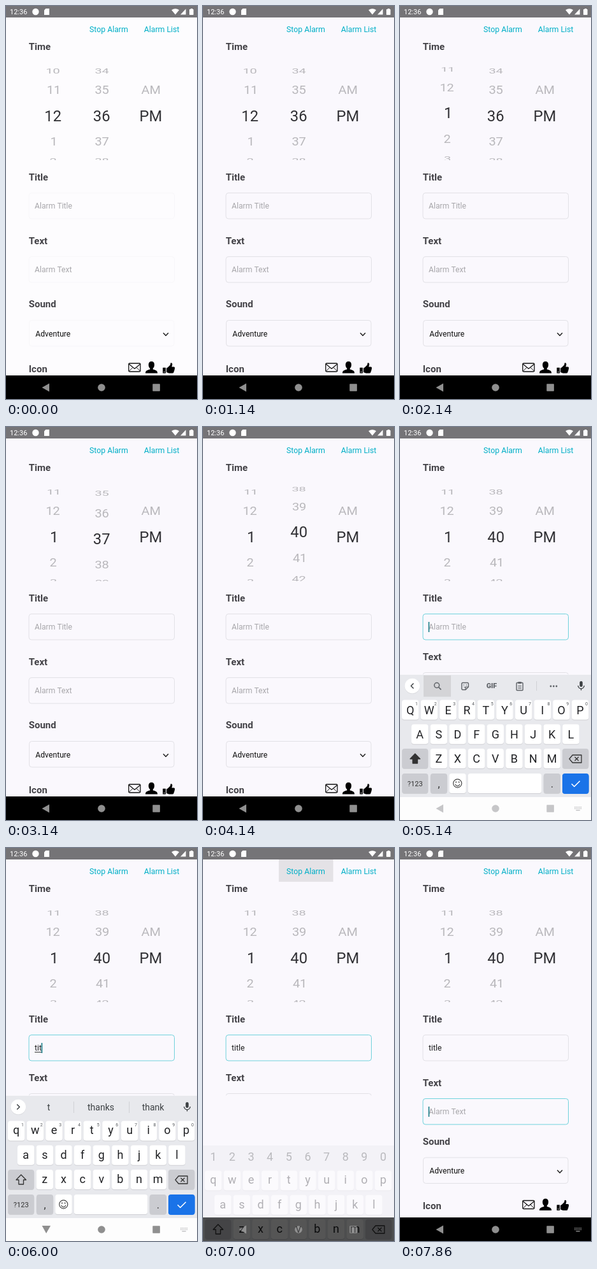
Write an HTML page with a canvas that moves like this. It is 300 px wide and 617 px high and loops after 8 s.

```html
<!DOCTYPE html>
<html lang="en">
<head>
<meta charset="utf-8">
<title>Alarm form</title>
<style>
html, body { margin: 0; width: 100%; height: 100%; overflow: hidden; background: #faf8fd; }
canvas { display: block; width: 300px; height: 617px; }
</style>
</head>
<body>
<canvas id="stage"></canvas>
<script>
const W = 300, H = 617, LOOP = 8000, STEP = 1000 / 7;
const BG = '#faf8fd', INK = '#202124', ICON = '#5f6368', CYAN = '#00afc7', RING = '#70d2dc';
const FONT = 'Roboto, "Open Sans", sans-serif';
const dpr = Math.max(1, window.devicePixelRatio || 1);

function prepare(canvas) {
  canvas.width = W * dpr;
  canvas.height = H * dpr;
  const c = canvas.getContext('2d');
  c.scale(dpr, dpr);
  c.lineJoin = 'round';
  return c;
}
const stage = document.getElementById('stage');
const board = document.createElement('canvas');
const main = prepare(stage), keys = prepare(board);
let g = main;

// Drawing helpers
function text(s, x, y, size, color, align = 'left', weight = 400) {
  g.font = `${weight} ${size}px ${FONT}`;
  g.textAlign = align;
  g.fillStyle = color;
  g.fillText(s, x, y);
}
// Centres the visible ink rather than the advance width
function inkText(s, y, size, color) {
  g.font = `400 ${size}px ${FONT}`;
  g.textAlign = 'left';
  const m = g.measureText(s);
  text(s, (m.actualBoundingBoxLeft - m.actualBoundingBoxRight) / 2, y, size, color);
}
function rect(x, y, w, h, color) {
  g.fillStyle = color;
  g.fillRect(x, y, w, h);
}
function round(x, y, w, h, r, fill, stroke, lw = 1) {
  g.beginPath();
  g.roundRect(x, y, w, h, r);
  if (fill) { g.fillStyle = fill; g.fill(); }
  if (stroke) { g.strokeStyle = stroke; g.lineWidth = lw; g.stroke(); }
}
function disc(x, y, r, fill, stroke, lw = 1) {
  round(x - r, y - r, 2 * r, 2 * r, r, fill, stroke, lw);
}
function trace(pts) {
  g.beginPath();
  for (let i = 0; i < pts.length; i += 2) g.lineTo(pts[i], pts[i + 1]);
}
function line(pts, color, lw = 1, closed = false) {
  trace(pts);
  if (closed) g.closePath();
  g.strokeStyle = color;
  g.lineWidth = lw;
  g.stroke();
}
function poly(pts, color) {
  trace(pts);
  g.fillStyle = color;
  g.fill();
}
function arc(x, y, r, from, to, color, lw) {
  g.beginPath();
  g.arc(x, y, r, from, to);
  g.strokeStyle = color;
  g.lineWidth = lw;
  g.stroke();
}
function shape(d, color) {
  g.fillStyle = color;
  g.fill(new Path2D(d));
}

// Eased value between [time, value] stops
function track(t, stops) {
  if (t <= stops[0][0]) return stops[0][1];
  for (let i = 1; i < stops.length; i++) {
    const [t0, a] = stops[i - 1], [t1, b] = stops[i];
    if (t <= t1) {
      const u = (t - t0) / (t1 - t0);
      return a + (b - a) * u * u * (3 - 2 * u);
    }
  }
  return stops[stops.length - 1][1];
}

function statusBar() {
  rect(0, 0, W, 18, '#757477');
  text('12:36', 6, 13, 11, '#fff');
  disc(46.5, 9, 5.2, '#fff');
  poly([62.5, 4, 68, 4, 68, 14, 60, 14, 60, 6.5], '#fff');
  shape('M260 6.3 Q266 2.2 272 6.3 L266 13.5 Z', '#fff');
  poly([274, 13.5, 282.5, 13.5, 282.5, 4.5], '#fff');
  rect(290, 4, 3, 2, '#fff');
  round(288, 5, 6.5, 9, 0.8, '#fff');
}

function wheel(x, pos, lo, hi, label) {
  const near = Math.round(pos);
  for (let k = Math.max(lo, near - 3); k <= Math.min(hi, near + 3); k++) {
    const a = (k - pos) * 0.5;
    if (Math.abs(a) > 1.42) continue;
    const active = Math.abs(k - pos) < 0.5, size = active ? 23.8 : 20;
    g.save();
    g.translate(x, 172.3 + 84 * Math.sin(a));
    g.scale(1, Math.cos(a));
    inkText(label(k), size * 0.36, size, active ? '#303034' : '#b9b8bc');
    g.restore();
  }
}

function picker(t) {
  const hour = track(t, [[1280, 0], [2143, 1.12], [2570, 1]]);
  const minute = track(t, [[2710, 36], [4142, 40.19], [4290, 40.19], [4710, 40]]);
  g.save();
  g.beginPath();
  g.rect(0, 92, W, 150);
  g.clip();
  wheel(74, hour, -9, 9, k => String((k + 23) % 12 + 1));
  wheel(150.5, minute, 0, 59, k => String(k).padStart(2, '0'));
  wheel(227, 1, 0, 1, k => ['AM', 'PM'][k]);
  g.restore();
}

function field(y, hint, value, focused, border, composing) {
  round(36, y + 0.5, 228.5, 40.5, 4, null, focused ? RING : border);
  text(value || hint, 45, y + 25.3, 12.2, value ? '#1c1c1e' : '#a8a7ab');
  const w = value ? g.measureText(value).width : 0;
  if (composing && w) rect(45, y + 27, w, 1, '#333');
  return 45 + w;
}
function caret(x, y) {
  rect(x - 0.5, y + 13, 1.8, 16, '#2b8791');
}

function envelope(y) {
  round(192.7, y - 7, 18.3, 13, 1.5, null, '#111', 1.3);
  line([193, y - 6, 202, y + 1.5, 211, y - 6], '#111', 1.2);
  line([193, y + 5.5, 199, y - 0.5], '#111', 1);
  line([211, y + 5.5, 205, y - 0.5], '#111', 1);
}
function person(y) {
  g.save();
  g.translate(228.5, y);
  shape('M0 -10 C6 -10 5.5 -1.5 2.3 1 L2.3 2.5 C6 3.5 9.5 4 9.5 8.5 L-9.5 8.5 C-9.5 4 -6 3.5 -2.3 2.5 L-2.3 1 C-5.5 -1.5 -6 -10 0 -10 Z', '#000');
  g.restore();
}
function thumb(y) {
  g.save();
  g.translate(246, y);
  round(0.3, -0.8, 4.6, 8.8, 0.5, '#000');
  shape('M6 0 L8 -1 L12 -5 L12.5 -8 Q15.5 -9 15.2 -5 L14.3 -2 L18 -2 Q19.8 -1.5 19 0.6 Q19.3 2 18.4 3 Q18.6 4.6 17.6 5.4 Q17.6 8 15.5 8 L10 8 L6 6.5 Z', '#000');
  disc(2.6, 6, 0.7, '#fff');
  g.restore();
}

function form(t, s) {
  const border = `rgba(226,225,230,${s.settle})`;
  if (t > 6850 && t < 7270) rect(119, 18, 85.5, 35, '#e4e2e6');
  text('Stop Alarm', 131, 41, 12.3, CYAN);
  text('Alarm List', 216.7, 41, 12.3, CYAN);

  const label = (name, y) => text(name, 35.7, y, 15, '#434247', 'left', 700);
  const inTitle = s.focus === 'title', inText = s.focus === 'text';
  label('Time', 69.3);
  picker(t);

  label('Title', 273.5);
  const end = field(293, 'Alarm Title', s.title, inTitle, border, t < 6700);
  if (inTitle && t < 6850) caret(end, 293);

  let dy = inTitle ? -8 : 0;
  label('Text', 373.5 + dy);
  field(393 + dy, 'Alarm Text', '', inText, border);
  if (inText) caret(45, 393);

  if (inText) dy -= 7.5;
  label('Sound', 473 + dy);
  round(36.5, 493.5 + dy, 227.5, 40.5, 4, null, border);
  text('Adventure', 46.3, 518.7 + dy, 12.2, '#111');
  line([247, 513.3 + dy, 251, 517.5 + dy, 255, 513.3 + dy], '#222', 1.5);

  label('Icon', 574.5 + dy);
  envelope(568 + dy);
  person(568 + dy);
  thumb(568.5 + dy);
}

function navBar(t, s) {
  const light = t > 4990 && t < 6990;
  const fading = light && t < 5270, returning = t > 6990 && t < 7130;
  const c = fading ? '#c6c6c8' : returning ? '#5a5a5a' : '#8f8f8f';
  rect(0, 580, W, 37, light ? '#fdfdfd' : '#000');
  if (light && !fading) poly([56.5, 593, 70, 593, 63.2, 605], c);
  else poly([68, 592.5, 68, 605.5, 56.5, 599], c);
  disc(150, 599, 5.8, c);
  round(230.3, 593.2, 11.6, 11.6, 0.8, c);
  if (light || s.focus === 'text') {
    const k = light ? '#c0c0c2' : '#8a8a8a';
    for (let r = 0; r < 2; r++)
      for (let i = 0; i < 5; i++) rect(274 + i * 2.4, 596 + r * 2.4, 1.4, 1.4, k);
    rect(276.4, 601, 6.2, 1.4, k);
  }
}

// Keyboard
const DIGITS = [...'1234567890'], PITCH = 29.65, GREY = '#cbccd1';

function key(x, y, w, fill, shadow = '#cfd0d4') {
  round(x, y + 1, w, 31, 4, shadow);
  round(x, y, w, 31, 4, fill);
}
function letters(row, x0, y, upper) {
  [...row].forEach((ch, i) => {
    const x = x0 + i * PITCH;
    key(x - 13.2, y, 26.4, '#fff');
    text(upper ? ch.toUpperCase() : ch, x, y + (upper ? 22.3 : 20.8), 18, INK, 'center');
  });
}
function mic(x, y) {
  round(x - 2.3, y - 7, 4.6, 9, 2.3, '#3c4043');
  arc(x, y, 4.8, 0, Math.PI, '#3c4043', 1.3);
  line([x, y + 4.5, x, y + 7.5], '#3c4043', 1.3);
}
function toolIcons() {
  disc(57.8, 405.5, 3.9, null, ICON, 1.5);
  line([60.7, 408.5, 64.5, 412.3], ICON, 1.7);
  line([98, 401.5, 106.5, 401.5, 107.5, 402.5, 107.5, 408, 103, 412.5, 98, 412.5, 97, 411.5, 97, 402.5], ICON, 1.4, true);
  line([103, 412.5, 103, 408, 107.5, 408], ICON, 1.2);
  disc(100.2, 405, 0.8, ICON);
  disc(104.3, 405, 0.8, ICON);
  arc(102.2, 406.5, 2.4, 0.6, 2.6, ICON, 1);
  text('GIF', 144, 410.4, 10.8, ICON, 'center', 900);
  round(183, 401.5, 10, 12, 1, null, ICON, 1.4);
  rect(185.5, 400, 5, 3, ICON);
  for (const y of [406, 408.3, 410.6]) line([185.3, y, 190.7, y], ICON, 0.9);
  rect(214, 399, 1, 15, '#d0d1d5');
  for (const x of [236.8, 241.3, 245.8]) disc(x, 407, 1.4, ICON);
}
function strip(t) {
  if (t > 6700) {
    DIGITS.forEach((d, i) => text(d, 16.2 + i * PITCH, 413, 18, '#3c4043', 'center'));
    return;
  }
  const typing = t > 5560;
  if (t < 5420) rect(37, 390, 43, 33.5, '#d4d4d7');
  disc(19.3, 407.3, 11.8, '#d8d9dd');
  disc(19.3, 406.5, 11.8, '#fff');
  const d = typing ? 2 : -2;
  line([19.3 - d, 402.5, 19.3 + d, 406.5, 19.3 - d, 410.5], '#3c4043', 1.5);
  mic(284.5, 406);
  if (!typing) return toolIcons();
  if (t < 5850) return;
  const words = t < 6420 ? ['t', 'thanks', 'thank'] : ['title', 'titles', 'titled'];
  words.forEach((w, i) => text(w, 67 + i * 82, 412, 14, '#3c4043', 'center'));
  for (const x of [106, 193]) rect(x, 398, 1, 18, '#cfd0d4');
}
function keyboard(t) {
  const upper = t < 5560;
  g.clearRect(0, 0, W, H);
  rect(0, 389, W, 192, '#e8e9ed');
  strip(t);
  letters('qwertyuiop', 16.2, 428.5, upper);
  if (t < 6700)
    DIGITS.forEach((d, i) => text(d, 26 + i * PITCH, 437, 7, '#55585c', 'center'));
  letters('asdfghjkl', 31.2, 466.8, upper);

  key(3.2, 505, 41, GREY);
  const shift = [23.7, 513, 31.5, 521, 27.5, 521, 27.5, 528, 20, 528, 20, 521, 16, 521];
  if (upper) poly(shift, '#333');
  line(shift, '#333', 1.3, true);
  letters('zxcvbnm', 60.8, 505, upper);
  key(255, 505, 41.3, GREY);
  line([266, 521, 271, 515, 285, 515, 285, 527, 271, 527], '#333', 1.3, true);
  line([274.5, 518, 280.5, 524], '#333', 1.3);
  line([280.5, 518, 274.5, 524], '#333', 1.3);

  key(3.2, 544, 41, GREY);
  text('?123', 23.7, 563.8, 11, '#333', 'center');
  key(47.8, 544, 26.4, GREY);
  text(',', 61, 566, 16, '#333', 'center');
  key(77.3, 544, 26.4, '#fff');
  disc(90.3, 559.5, 6.6, null, '#444', 1.2);
  disc(88, 557.5, 1, '#444');
  disc(92.6, 557.5, 1, '#444');
  arc(90.3, 560, 3.6, 0.2, Math.PI - 0.2, '#444', 1.1);
  key(106.8, 544, 115.5, '#fff');
  key(225.6, 544, 26.4, GREY);
  text('.', 238.8, 566, 16, '#333', 'center');
  key(255, 544, 41.5, '#1a73e8', '#1a73e8');
  line([269.5, 560.3, 273.7, 564.5, 282.5, 555.7], '#fff', 1.6);
}

function render(t) {
  const typed = [5560, 5850, 5990, 6135, 6280].filter(at => t >= at).length;
  const s = {
    title: 'title'.slice(0, typed),
    focus: t > 7850 ? 'text' : t > 4850 && t < 7280 ? 'title' : '',
    settle: t < 140 ? 0.2 : Math.min(1, 0.2 + t / 700)
  };
  // How far the keyboard has slid down
  const drop = t < 6000
    ? track(t, [[4850, 228], [5000, 78], [5142, 0]])
    : track(t, [[6858, 0], [7000, 78], [7142, 228]]);
  const shown = drop < 228;

  g = main;
  rect(0, 0, W, H, BG);
  if (s.settle < 1) rect(0, 0, W, H, `rgba(255,255,255,${(1 - s.settle) * 0.6})`);
  g.save();
  g.beginPath();
  g.rect(0, 0, W, shown ? 388.5 : 580);
  g.clip();
  form(t, s);
  g.restore();
  statusBar();
  navBar(t, s);
  if (shown) {
    g = keys;
    keyboard(t);
    g = main;
    g.globalAlpha = Math.max(0, 1 - drop / 228 * 1.95);
    g.drawImage(board, 0, drop, W, H);
    g.globalAlpha = 1;
  }
}

function tick(now) {
  const t = now % LOOP;
  render(Math.floor((t + 5) / STEP) % 56 * STEP);
  requestAnimationFrame(tick);
}
requestAnimationFrame(tick);
</script>
</body>
</html>
```
